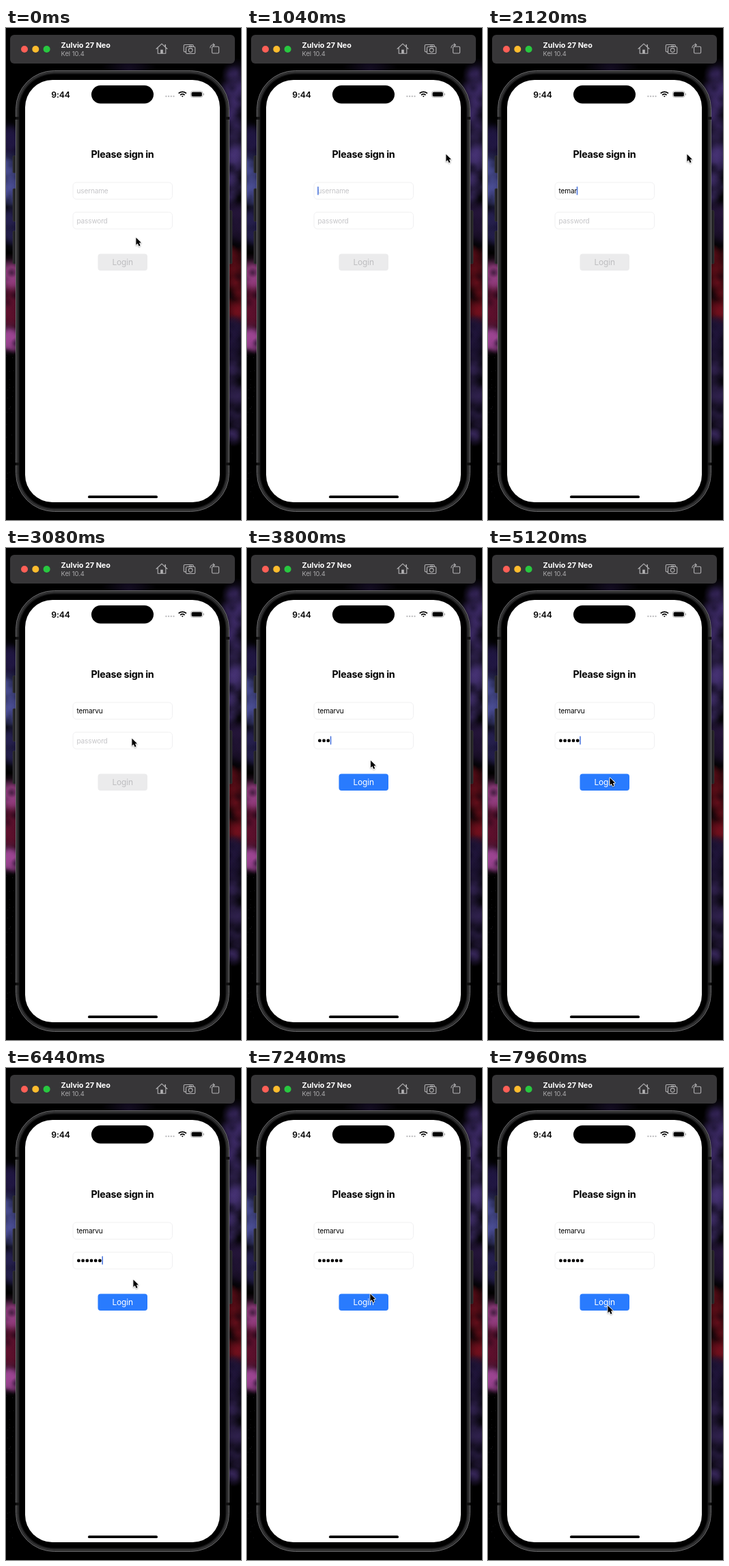
Recreate the animation shown at these times as an HTML page with a canvas. Size 344 by 720 pixels, loop 8000 ms.

```html
<!DOCTYPE html>
<html lang="en">
<head>
<meta charset="utf-8">
<title>Sign in</title>
<style>
html, body { margin: 0; width: 100%; height: 100%; overflow: hidden; background: #000; }
canvas { display: block; width: 344px; height: 720px; }
</style>
</head>
<body>
<canvas id="stage"></canvas>
<script>
const W = 344, H = 720, LOOP = 8000, TAU = Math.PI * 2;
const canvas = document.getElementById('stage');
const dpr = window.devicePixelRatio || 1;
let ctx = setup(canvas);

const USER = 'temarvu';
const USER_FOCUS = 600, PASS_FOCUS = 3160;
const userKeys = keys(1360, 190, USER.length);
const passKeys = [...keys(3380, 170, 5), 5400];

const rest = { x: 190, y: 306 };
const moves = [
  { from: 120, to: 480, x: 181, y: 240 },
  { from: 640, to: 1000, x: 291, y: 184 },
  { from: 2520, to: 3000, x: 184, y: 278 },
  { from: 3240, to: 4280, x: 178, y: 335.5 },
  { from: 5640, to: 6320, x: 186, y: 309 },
  { from: 6880, to: 7560, x: 175, y: 347 }
];

function setup(c) {
  c.width = W * dpr;
  c.height = H * dpr;
  const context = c.getContext('2d');
  context.scale(dpr, dpr);
  return context;
}

function keys(first, step, count) {
  return Array.from({ length: count }, (_, i) => first + i * step);
}

function layer(draw) {
  const c = document.createElement('canvas');
  const main = ctx;
  ctx = setup(c);
  draw();
  ctx = main;
  return c;
}

function box(x, y, w, h, r, fill, stroke, width = 1) {
  ctx.beginPath();
  ctx.roundRect(x, y, w, h, r);
  if (fill) { ctx.fillStyle = fill; ctx.fill(); }
  if (stroke) { ctx.strokeStyle = stroke; ctx.lineWidth = width; ctx.stroke(); }
}

function dot(x, y, r, fill) {
  ctx.beginPath();
  ctx.arc(x, y, r, 0, TAU);
  ctx.fillStyle = fill;
  ctx.fill();
}

function line(...pts) {
  pts.forEach(([x, y], i) => i ? ctx.lineTo(x, y) : ctx.moveTo(x, y));
}

function text(str, x, y, size, weight, fill, align = 'left', spacing = 0) {
  ctx.font = `${weight} ${size}px Inter, sans-serif`;
  ctx.letterSpacing = spacing + 'px';
  ctx.textAlign = align;
  ctx.fillStyle = fill;
  ctx.fillText(str, x, y);
}

function random(seed) {
  return () => (seed = (seed * 16807) % 2147483647) / 2147483647;
}

function puff(x, y, r, rgb, alpha) {
  const g = ctx.createRadialGradient(x, y, 0, x, y, r);
  g.addColorStop(0, `rgba(${rgb},${alpha})`);
  g.addColorStop(1, `rgba(${rgb},0)`);
  ctx.fillStyle = g;
  ctx.fillRect(x - r, y - r, r * 2, r * 2);
}

// A nebula patch: many soft puffs with darker gaps between them.
function cloud(rnd, x, y, spread, rgb) {
  for (let i = 0; i < 26; i++) {
    const dx = (rnd() - 0.5) * 24, dy = (rnd() - 0.5) * 2 * spread;
    const dark = i % 5 === 4;
    puff(x + dx, y + dy, dark ? 8 : 11 + rnd() * 10, dark ? '6,4,16' : rgb, 0.38);
  }
}

function drawWallpaper() {
  const rnd = random(77);
  ctx.fillStyle = '#000';
  ctx.fillRect(0, 0, W, H);
  cloud(rnd, 4, 170, 20, '34,24,70');
  cloud(rnd, 4, 226, 30, '88,92,176');
  cloud(rnd, 4, 290, 22, '40,34,84');
  cloud(rnd, 4, 365, 16, '150,62,130');
  cloud(rnd, 4, 408, 24, '104,18,50');
  cloud(rnd, 4, 455, 9, '160,70,150');
  cloud(rnd, 336, 105, 42, '72,50,122');
  cloud(rnd, 336, 205, 48, '78,56,130');
  cloud(rnd, 336, 285, 24, '38,22,60');
  cloud(rnd, 336, 375, 46, '134,18,34');
  cloud(rnd, 336, 455, 24, '34,22,62');
  cloud(rnd, 336, 545, 60, '66,46,108');
  puff(180, 62, 40, '40,26,70', 0.5);
  for (let i = 0; i < 30; i++) {
    dot(rnd() * 13, 480 + rnd() * 220, 0.3, 'rgba(190,190,220,0.45)');
  }
}

function icon(x, y, draw) {
  ctx.save();
  ctx.translate(x, y);
  ctx.strokeStyle = ctx.fillStyle = '#b3b2b4';
  ctx.lineWidth = 1.1;
  ctx.lineJoin = ctx.lineCap = 'round';
  ctx.beginPath();
  draw();
  ctx.stroke();
  ctx.restore();
}

function drawToolbar() {
  box(6, 10, 329, 42, 6, '#373638');
  ['#ff5f57', '#febc2e', '#28c840'].forEach((c, i) => dot(27 + i * 16.3, 31, 5, c));
  text('Zulvio 27 Neo', 80.5, 29.3, 10.8, 700, '#fff');
  text('Kel 10.4', 80.5, 41, 9.3, 400, '#adacae');
  icon(228, 30.5, () => {
    line([-8, 0], [0, -7.4], [8, 0]);
    line([-5.8, -1.6], [-5.8, 6.7], [5.8, 6.7], [5.8, -1.6]);
    ctx.fillRect(-1.8, 1.2, 3.6, 5.5);
    ctx.fillRect(4.4, -6.4, 1.6, 4);
  });
  icon(268.5, 31, () => {
    ctx.roundRect(-8.2, -6.5, 14, 10.4, 1.5);
    ctx.stroke();
    box(-5, -3.5, 13.3, 10, 1.5, '#373638', '#b3b2b4', 1.1);
    ctx.beginPath();
    line([-0.6, -3.5], [0.2, -4.8], [3.2, -4.8], [4, -3.5]);
    ctx.moveTo(4.6, 1.5);
    ctx.arc(1.7, 1.5, 2.9, 0, TAU);
  });
  icon(305, 31, () => {
    ctx.roundRect(-3.4, -3.8, 10, 9.8, 1.4);
    ctx.moveTo(-6, -2);
    ctx.arcTo(-6, -6.2, 0, -6.2, 4);
    ctx.lineTo(0, -6.2);
    line([-1.8, -8.2], [0.4, -6.2], [-1.8, -4.4]);
  });
}

function drawPhone() {
  const button = (x, y, h) => box(x, y, 5, h, 1.5, '#242426', '#39393c', 0.6);
  button(10, 187, 25);
  button(10, 235, 48);
  button(10, 297, 48);
  button(326, 267, 78);
  box(14.5, 62.5, 312, 645, 56, '#2b2b2c', '#6b6b6d');
  box(17, 65, 307, 640, 53.5, '#1d1d1e', '#444446', 0.8);
  ctx.fillStyle = '#111';
  for (const x of [14, 322]) {
    for (const y of [130, 636]) ctx.fillRect(x, y, 5, 4);
  }
  box(19.5, 67.5, 302, 635, 51, '#000');
  box(28, 76, 285, 618, 40, '#fff');
  box(125, 84, 91, 26.5, 13.25, '#000');
  box(120, 684.3, 102, 3.7, 1.85, '#000');
}

function drawStatus() {
  text('9:44', 80, 101.5, 12.2, 600, '#000', 'center', -0.1);
  for (let i = 0; i < 4; i++) dot(234.4 + i * 3.7, 100, 1.15, '#bdbdbf');
  ctx.strokeStyle = '#000';
  ctx.lineWidth = 1.8;
  for (const r of [1.2, 4.6, 8]) {
    ctx.beginPath();
    ctx.arc(258.3, 101.3, r, -TAU * 3 / 8, -TAU / 8);
    ctx.stroke();
  }
  box(270.4, 92.6, 17.6, 8.8, 2.8, null, '#a5a5a5', 0.8);
  box(271.6, 93.8, 15.2, 6.4, 1.8, '#000');
  box(288.9, 95.6, 1.1, 2.8, 0.6, '#a5a5a5');
}

const backdrop = layer(() => {
  drawWallpaper();
  drawToolbar();
  drawPhone();
  drawStatus();
});

function typed(times, t) {
  return times.filter(k => k <= t).length;
}

// The caret restarts its blink at focus and at every key.
function caretOn(t, focus, times) {
  const last = Math.max(focus, ...times.filter(k => k <= t));
  return t >= focus && (t - last) % 1000 < 500;
}

function drawCaret(x, y) {
  box(x - 0.75, y - 6.2, 1.5, 12.4, 0.7, '#4470dc');
}

function drawField(y, label, value) {
  box(98, y, 145.5, 24.5, 5, '#fff', '#ececee', 0.8);
  text(value ?? label, 103.5, y + 16, 10.1, 400, value == null ? '#c5c5c8' : '#000', 'left', -0.18);
}

function drawForm(t) {
  const letters = typed(userKeys, t), dots = typed(passKeys, t);
  text('Please sign in', 170.5, 189.8, 14.3, 700, '#000', 'center', -0.3);

  const name = USER.slice(0, letters);
  drawField(226, 'username', name || null);
  if (t < PASS_FOCUS && caretOn(t, USER_FOCUS, userKeys)) {
    drawCaret(104 + ctx.measureText(name).width, 238.3);
  }

  drawField(269.5, 'password', dots ? '' : null);
  for (let i = 0; i < dots; i++) dot(106.4 + i * 6.2, 281.9, 2.4, '#000');
  if (caretOn(t, PASS_FOCUS, passKeys)) drawCaret(104 + dots * 6.2, 281.5);

  const ready = letters && dots;
  box(134.5, 330.5, 72.5, 24.5, 4, ready ? '#297bfe' : '#ebebec');
  text('Login', 170.7, 347.2, 12, 400, ready ? '#fff' : '#bebec0', 'center', -0.15);
}

function pointerAt(t) {
  let { x, y } = rest;
  for (const m of moves) {
    const k = Math.min(1, Math.max(0, (t - m.from) / (m.to - m.from)));
    const ease = k * k * (3 - 2 * k);
    x += (m.x - x) * ease;
    y += (m.y - y) * ease;
  }
  return [x, y];
}

function drawPointer(t) {
  ctx.save();
  ctx.translate(...pointerAt(t));
  ctx.beginPath();
  line([0.4, 0.8], [0.4, 11.4], [2.8, 9.2], [4.6, 13.2], [6.6, 12.3], [4.9, 8.5], [8, 8.3]);
  ctx.closePath();
  ctx.lineJoin = 'round';
  ctx.shadowColor = 'rgba(0,0,0,0.3)';
  ctx.shadowBlur = 2 * dpr;
  ctx.shadowOffsetY = dpr;
  ctx.strokeStyle = '#fff';
  ctx.lineWidth = 1.6;
  ctx.stroke();
  ctx.shadowColor = 'transparent';
  ctx.fillStyle = '#000';
  ctx.fill();
  ctx.restore();
}

const start = performance.now();
function tick() {
  const t = (performance.now() - start) % LOOP;
  ctx.drawImage(backdrop, 0, 0, W, H);
  drawForm(t);
  drawPointer(t);
  requestAnimationFrame(tick);
}
tick();
</script>
</body>
</html>
```
